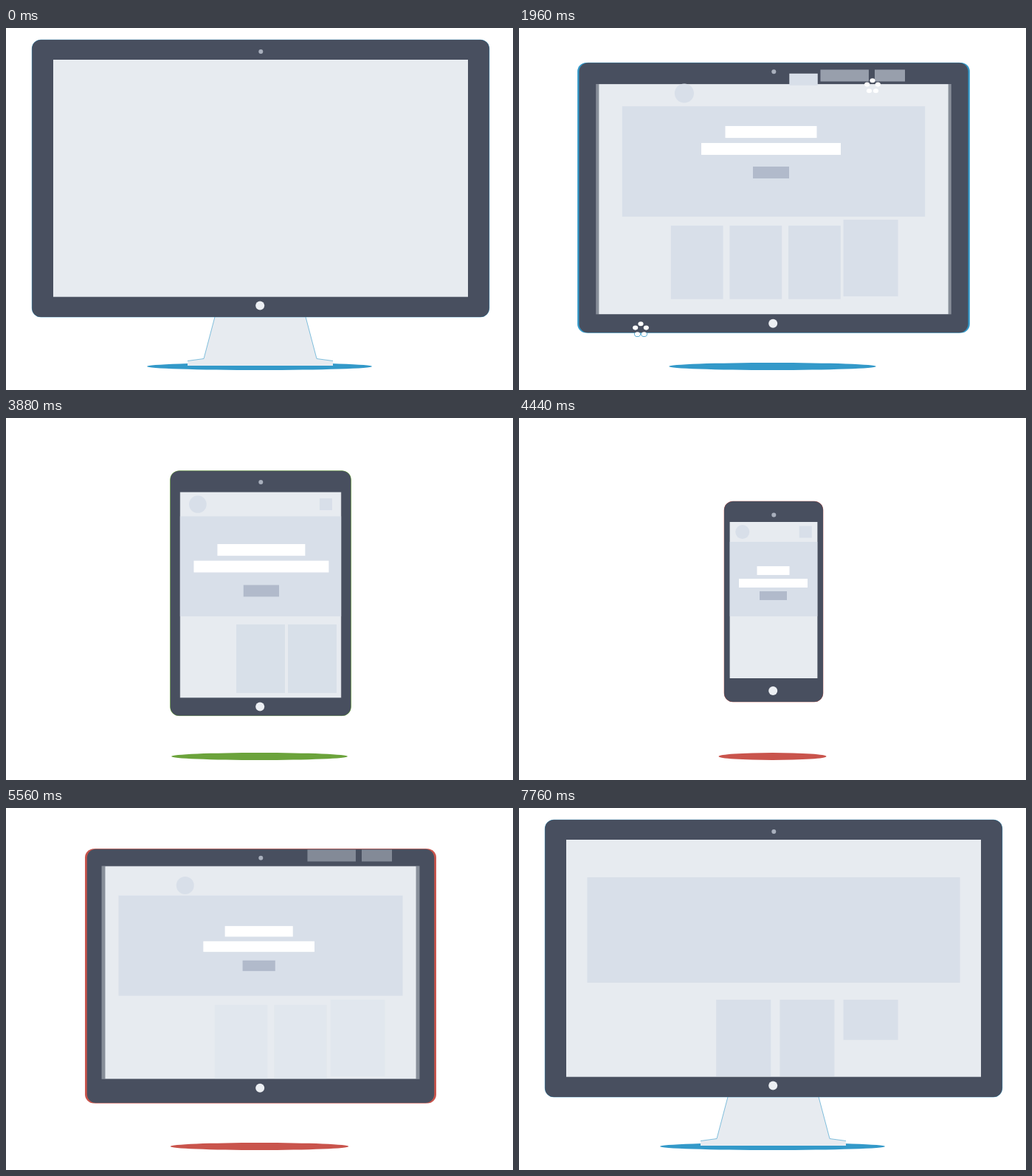
Animation, 687 px wide and 491 px high, one loop 8.66 s. Source, as an HTML page with a canvas:

```html
<!DOCTYPE html>
<html lang="en">
<head>
<meta charset="utf-8">
<title>Responsive layout</title>
<style>
  html, body { margin: 0; width: 100%; height: 100%; overflow: hidden; background: #fff; }
  canvas { display: block; }
</style>
</head>
<body>
<canvas id="stage" width="687" height="491"></canvas>
<script>
const ctx = document.getElementById('stage').getContext('2d');
const LOOP = 8660, CENTER = 345;
const BEZEL = '#484f5f', PAGE = '#e7ebf0', BLOCK = '#d8dfe9', BUTTON = '#b1bacb';
const BLUE = '#3399c9', GREEN = '#6ba33b', RED = '#c9544c';

const clamp = x => Math.max(0, Math.min(1, x));
const span = (t, from, length) => clamp((t - from) / length);
const mix = (a, b, p) => Array.isArray(a) ? a.map((v, i) => mix(v, b[i], p)) : a + (b - a) * p;
const easeIn = u => u * u;
const easeOut = (u, power = 2) => 1 - (1 - u) ** power;
const easeInOut = u => u < .5 ? 2 * u * u : 1 - 2 * (1 - u) ** 2;

const desktop = {
  body: [619.5, 376], bodyY: 204, screen: [562, 321.5], screenY: 203.75,
  camera: 172, home: 172.5, shadow: 152.5,
  header: 43, hero: 159, margin: 115.5, logo: 14, links: 110.5,
  textX: 341.5, textY: 141, textPitch: 23, buttonGap: 9, textWidths: [124, 189, 49],
  card: { x: 181, pitch: 86.2, width: 74, height: 104, gap: 15 }
};
const tablet = {
  ...desktop,
  body: [252, 336], bodyY: 237, screen: [225, 283], screenY: 239.5,
  camera: 153, home: 156, shadow: 122.5,
  header: 33, hero: 138, margin: 12.5, logo: 12, links: 0,
  textX: 346, textY: 177, buttonGap: 11,
  card: { x: 242, pitch: 70, width: 66, height: 93, gap: 11 }
};
const phone = {
  ...tablet,
  body: [134, 272], bodyY: 249, screen: [118.5, 212], screenY: 247,
  camera: 117.5, home: 121, shadow: 73,
  header: 27, hero: 101, margin: 7.5, logo: 9.5,
  textX: 344.5, textY: 207, textPitch: 17, buttonGap: 0, textWidths: [44, 93, 37],
  card: { x: 293, width: 106, height: 75, gap: 9 }
};
const devices = [desktop, tablet, phone];

// Follows one value from desktop to tablet to phone and back.
function track(read, { start = 1600, end = 2400, ease = easeInOut, power = 2.1 } = {}) {
  const [large, medium, small] = devices.map(read);
  return t => {
    if (t < 3000) return mix(large, medium, ease(span(t, start, end - start)));
    if (t < 5000) return mix(medium, small, easeInOut(span(t, 3760, 680)));
    return mix(small, large, easeOut(span(t, 5320, 680), power));
  };
}

const drop = power => ({ end: 2260, ease: easeOut, power });
const resize = { start: 1720, power: 2.7 };
const frame = {
  body: track(d => d.body, resize),
  bodyY: track(d => d.bodyY, drop(1.45)),
  screen: track(d => d.screen, resize),
  screenY: track(d => d.screenY, drop(1.83)),
  camera: track(d => -d.camera, { start: 1880, power: 3.5 }),
  home: track(d => d.home, { start: 1820 }),
  shadow: track(d => d.shadow)
};

// Boxes are [center x, center y, width, height].
const screenTop = d => d.screenY - d.screen[1] / 2;
const headerY = d => screenTop(d) + d.header / 2;

function heroBox(d) {
  return [CENTER, screenTop(d) + d.header + d.hero / 2, d.screen[0], d.hero];
}

function logoBox(d) {
  return [CENTER - d.screen[0] / 2 + d.margin + d.logo, headerY(d), d.logo * 2, d.logo * 2];
}

function menuBox(d) {
  const width = d.links ? 41 : 17;
  return [CENTER + d.screen[0] / 2 - d.margin - d.links - width / 2, headerY(d), width, 16];
}

const textBox = row => d => [
  d.textX,
  d.textY + row * d.textPitch + (row === 2 ? d.buttonGap : 0),
  d.textWidths[row],
  d.textPitch * .7
];

const cardBox = column => d => {
  const { x, pitch, width, height, gap } = d.card;
  const top = screenTop(d) + d.header + d.hero + gap;
  return [x + pitch * column + width / 2, top + height / 2, width, height];
};

// "last" is the smallest device that still shows the part.
function part(color, box, intro, outro, { last = 2, fadeStart = 1570, ...look } = {}, timing = {}) {
  return {
    color, intro, outro, ...look,
    box: track(d => box(devices[Math.min(devices.indexOf(d), last)]), timing),
    alpha: track(d => devices.indexOf(d) <= last ? 1 : 0, { start: fadeStart, power: 1.2 })
  };
}

const small = (color, box, order, look, timing) =>
  part(color, box, [240 + 80 * order, 260], [7360 + 30 * (5 - order), 180], look, timing);
const card = column => part(BLOCK, cardBox(column),
  [620 + 160 * column, 320], [8085 - 160 * column, 320],
  { grow: 'down', last: [2, 1, 1, 0][column], fadeStart: 1960 }, { power: 2.4 });
const link = (x, width, order) =>
  small(BLOCK, d => [x, headerY(d), width, 16], order, { last: 0 });

const parts = [
  part(BLOCK, heroBox, [40, 360], [7600, 506], {}, { start: 1565 }),
  ...[3, 2, 1, 0].map(card),
  small(BLOCK, logoBox, 3, { round: true }, { start: 1540, power: 1.82 }),
  // The menu icon disappears before the first link takes its place.
  small(BLOCK, menuBox, 3, {
    fade: t => t < 5320 ? 1 : clamp(Math.abs(span(t, 5320, 680) - .4) * 4 - .4)
  }, { start: 1830 }),
  link(441.2, 65.5, 4),
  link(502.5, 41, 5),
  ...['#fff', '#fff', BUTTON].map((color, row) =>
    small(color, textBox(row), row * 2, {}, { start: 1960 }))
];

function fillBox(cx, cy, w, h) {
  ctx.fillRect(cx - w / 2, cy - h / 2, w, h);
}

function disc(x, y, rx, ry = rx) {
  ctx.beginPath();
  ctx.ellipse(x, y, rx, ry, 0, 0, Math.PI * 2);
}

function fillDisc(color, ...shape) {
  ctx.fillStyle = color;
  disc(...shape);
  ctx.fill();
}

function drawStand(t, accent) {
  const retracted = t < 5000 ? easeInOut(span(t, 1600, 260)) : 1 - easeInOut(span(t, 5700, 300));
  if (retracted === 1) return;
  const side = [[60.5, 388], [76.5, 448.5], [98.5, 451.5], [98.5, 458]];
  const mirrored = side.map(([x, y]) => [-x, y]).reverse();
  ctx.save();
  ctx.translate(344.5, -72 * retracted);
  ctx.beginPath();
  [...side, ...mirrored].forEach(point => ctx.lineTo(...point));
  ctx.fillStyle = PAGE;
  ctx.fill();
  ctx.beginPath();
  for (const edge of [side.slice(0, 3), mirrored.slice(1)]) {
    edge.forEach((point, i) => i ? ctx.lineTo(...point) : ctx.moveTo(...point));
  }
  ctx.strokeStyle = accent;
  ctx.lineWidth = .6;
  ctx.stroke();
  ctx.restore();
}

function drawBursts(t, paint) {
  const u = span(t, 1860, 220);
  if (u === 0 || u === 1) return;
  const reach = mix(3, 12, easeOut(u, 1.2));
  const size = 3.6 * Math.sin(Math.PI * u);
  for (const [x, y] of [[479, 79], [165, 409]]) {
    for (let i = 0; i < 5; i++) {
      const angle = -Math.PI / 2 + i * Math.PI * .4;
      paint(x + reach * Math.cos(angle), y + reach * Math.sin(angle), size, size * .85);
    }
  }
}

function bodyPath(t, cy) {
  const [w, h] = frame.body(t);
  ctx.beginPath();
  ctx.roundRect(CENTER - w / 2, cy - h / 2, w, h, 12);
}

function drawDevice(t, accent) {
  const cy = frame.bodyY(t);
  // Fast edges leave a tinted fringe.
  ctx.fillStyle = accent;
  for (const offset of [-6, 6]) {
    bodyPath(t + offset, cy);
    ctx.fill();
  }
  bodyPath(t, cy);
  ctx.strokeStyle = accent;
  ctx.lineWidth = .6;
  ctx.stroke();
  ctx.fillStyle = BEZEL;
  ctx.fill();

  // Two half-transparent neighbours soften a moving screen edge.
  ctx.fillStyle = PAGE;
  for (const [offset, opacity] of [[-6, .4], [6, .4], [0, .6]]) {
    ctx.globalAlpha = offset ? opacity : 1;
    const [w, h] = mix(frame.screen(t + offset), frame.screen(t), offset ? 0 : .5);
    fillBox(CENTER, frame.screenY(t), w - (offset ? 0 : softness(t)), h);
  }
  fillDisc('#a9b0bd', CENTER + .3, cy + frame.camera(t), 3);
  fillDisc('#eceff3', CENTER - .8, cy + frame.home(t), 6);
}

// How far the screen's width travels during one short exposure.
function softness(t) {
  return Math.abs(frame.screen(t + 3)[0] - frame.screen(t - 3)[0]);
}

function drawPart({ color, box, intro, outro, alpha, fade, grow, round }, t) {
  const leave = grow ? easeInOut : easeIn;
  const scale = easeOut(span(t, ...intro)) * (1 - leave(span(t, ...outro)));
  const opacity = alpha(t) * (fade ? fade(t) : 1);
  if (scale <= 0 || opacity <= 0) return;
  const [cx, cy, w, h] = box(t);
  ctx.globalAlpha = opacity;
  ctx.fillStyle = color;
  if (round) fillDisc(color, cx, cy, w / 2 * scale);
  else if (grow) fillBox(cx, cy - h * (1 - scale) / 2, w, h * scale);
  else fillBox(cx, cy, w * scale, h * scale);
  ctx.globalAlpha = 1;
}

function draw(t) {
  const accent = t < 2160 || t >= 5800 ? BLUE : t < 4100 ? GREEN : RED;
  ctx.fillStyle = '#fff';
  ctx.fillRect(0, 0, 687, 491);
  fillDisc(accent, 343.5, 459, frame.shadow(t), 5);
  drawStand(t, accent);
  drawBursts(t, (...dot) => {
    ctx.strokeStyle = accent;
    ctx.lineWidth = 1.6;
    disc(...dot);
    ctx.stroke();
  });
  drawDevice(t, accent);
  parts.forEach(item => drawPart(item, t));
  drawBursts(t, (...dot) => fillDisc('#fff', ...dot));
}

const began = performance.now();
function tick() {
  draw((performance.now() - began) % LOOP);
  requestAnimationFrame(tick);
}
tick();
</script>
</body>
</html>
```
